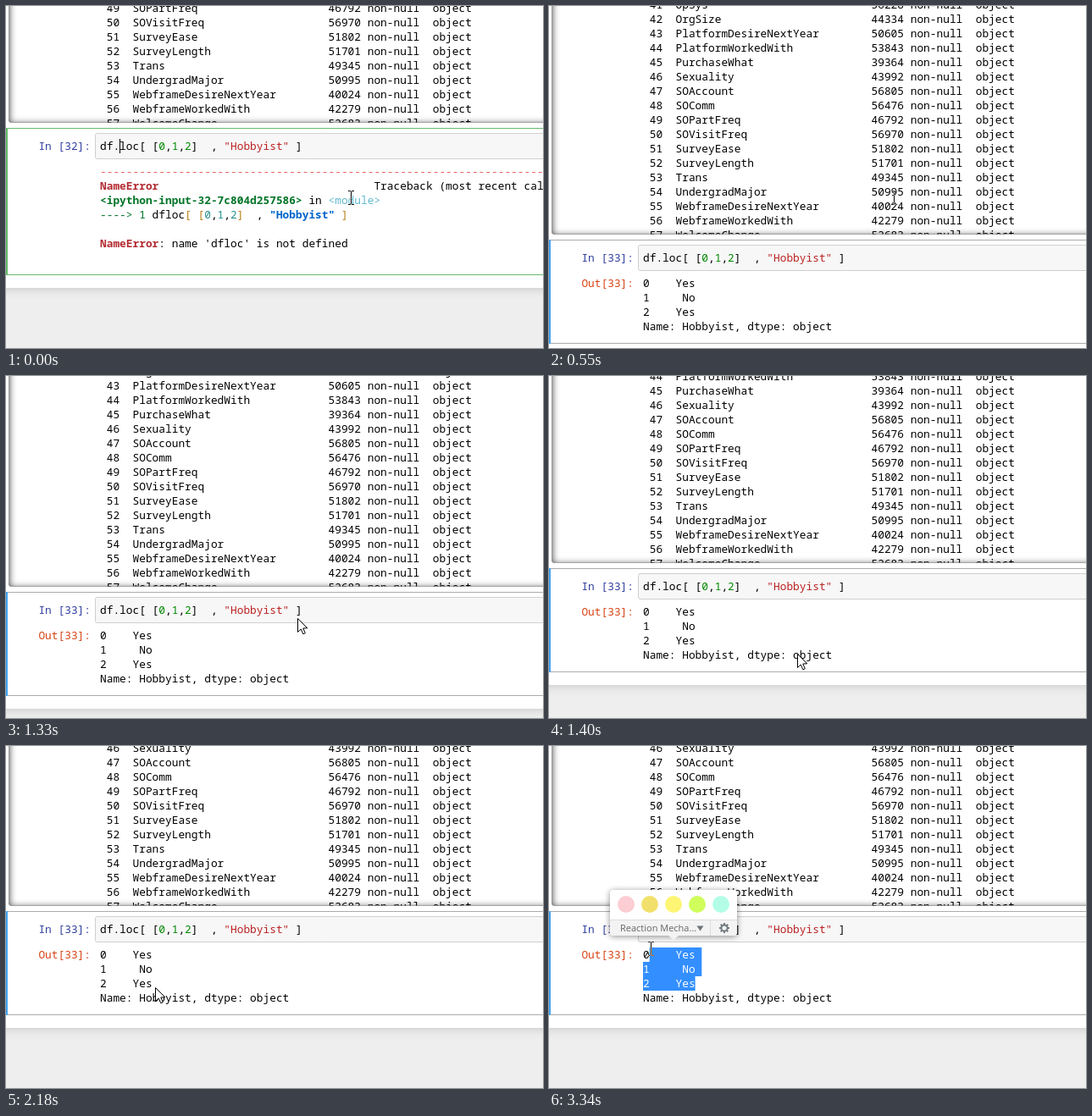
Recreate the animation shown at these times as an HTML page with a canvas. Size 634x404 px, loop 3.46 s.

```html
<!DOCTYPE html>
<html lang="en">
<head>
<meta charset="utf-8">
<title>Notebook cell</title>
<style>
html, body { margin: 0; width: 100%; height: 100%; overflow: hidden; background: #eee; }
canvas { display: block; }
</style>
</head>
<body>
<canvas id="stage" width="634" height="404"></canvas>
<script>
const W = 634, H = 404, LOOP = 3460;
const ctx = document.getElementById('stage').getContext('2d');
const CHAR = 7.7, LINE = 17, TEXT_X = 111;
const MONO = '12.83px "Noto Sans Mono", "DejaVu Sans Mono", monospace';
const INK = '#000', RED = '#b22b31', GREEN = '#007427', TEAL = '#258f8f', GOLD = '#b27d12';

const columns = [
  ['OpSys', 56228], ['OrgSize', 44334], ['PlatformDesireNextYear', 50605],
  ['PlatformWorkedWith', 53843], ['PurchaseWhat', 39364], ['Sexuality', 43992],
  ['SOAccount', 56805], ['SOComm', 56476], ['SOPartFreq', 46792],
  ['SOVisitFreq', 56970], ['SurveyEase', 51802], ['SurveyLength', 51701],
  ['Trans', 49345], ['UndergradMajor', 50995], ['WebframeDesireNextYear', 40024],
  ['WebframeWorkedWith', 42279], ['WelcomeChange', 52683]
];
const FIRST_ROW = 41;

const code = [['df.loc[ ['], ['0', '#080'], [','], ['1', '#080'], [','], ['2', '#080'],
  [']  , '], ['"Hobbyist"', '#ba2121'], [' ]']];
const traceback = [
  [['-'.repeat(75), '#e75c58']],
  [['NameError', RED, true], [' '.repeat(33) + 'Traceback (most recent call last)']],
  [['<ipython-input-32-7c804d257586>', GREEN, true], [' in '], ['<module>', '#5fb8cc']],
  [['----> 1', GREEN], [' dfloc'], ['[', GOLD], [' '], ['[', GOLD], ['0', TEAL], [','],
    ['1', TEAL], [','], ['2', TEAL], [']', GOLD], ['  , '], ['"Hobbyist"', '#0065ca', true],
    [' '], [']', GOLD]],
  [],
  [['NameError', RED, true], [": name 'dfloc' is not defined"]]
];
const result = ['0    Yes', '1     No', '2    Yes', 'Name: Hobbyist, dtype: object'];

// time, scroll offset
const scrolling = [[0, -51], [480, 81], [1240, 78], [1320, 60], [1400, 32], [1490, 7], [1570, 0]];
// time, x, y, shape
const pointer = [
  [0, 407, 226, 'beam'], [1160, 404, 227, 'arrow'], [1240, 384, 246, 'arrow'],
  [1320, 344, 286, 'arrow'], [1400, 293, 328, 'arrow'], [1490, 237, 314, 'arrow'],
  [1570, 202, 288, 'arrow'], [1640, 183, 270, 'arrow'], [1720, 180, 272, 'arrow'],
  [1800, 177, 275, 'arrow'], [1880, 175, 278, 'arrow'], [1960, 174, 281, 'arrow'],
  [2030, 175, 283, 'arrow'], [2180, 176, 285, 'arrow'], [2250, 170, 277, 'beam'],
  [2330, 175, 284, 'beam'], [2640, 170, 279, 'beam'], [2720, 159, 268, 'beam'],
  [2800, 147, 257, 'beam'], [2880, 136, 249, 'beam'], [2950, 128, 244, 'beam'],
  [3030, 121, 240, 'beam'], [3100, 120, 239, 'beam']
];

const at = (steps, t) => steps.findLast(s => s[0] <= t);

function rect(x, y, w, h, color) {
  ctx.fillStyle = color;
  ctx.fillRect(x, y, w, h);
}

function disc(x, y, r, color) {
  ctx.fillStyle = color;
  ctx.beginPath();
  ctx.arc(x, y, r, 0, 2 * Math.PI);
  ctx.fill();
}

function polygon(points, color) {
  ctx.fillStyle = color;
  ctx.beginPath();
  points.forEach(([x, y]) => ctx.lineTo(x, y));
  ctx.closePath();
  ctx.fill();
}

function shadow(color, blur, dy = 0) {
  ctx.shadowColor = color;
  ctx.shadowBlur = blur;
  ctx.shadowOffsetY = dy;
}

// Monospaced text on a character grid.
function mono(text, x, y, color = INK, bold = false) {
  ctx.font = (bold ? 'bold ' : '') + MONO;
  ctx.fillStyle = color;
  [...text].forEach((c, i) => {
    if (c !== ' ') ctx.fillText(c, x + i * CHAR, y);
  });
}

function spans(parts, x, y) {
  for (const [text, color, bold] of parts) {
    mono(text, x, y, color, bold);
    x += text.length * CHAR;
  }
}

function drawTable(off) {
  const bottom = 188.5 + off;
  ctx.save();
  ctx.beginPath();
  ctx.roundRect(3.5, -60, W + 60, bottom + 60, 2);
  ctx.clip();
  ctx.save();
  shadow('rgba(0,0,0,.8)', 8, 2);
  ctx.fillStyle = '#000';
  ctx.beginPath();
  ctx.rect(-60, -120, W + 200, bottom + 240);
  ctx.roundRect(3.5, -60, W + 60, bottom + 60, 2);
  ctx.fill('evenodd');
  ctx.restore();
  columns.forEach(([name, count], i) => {
    const id = FIRST_ROW + i;
    const row = ` ${id}  ${name.padEnd(30)}${count} non-null  object`;
    mono(row, TEXT_X, 143 + (id - 54) * LINE + off);
  });
  ctx.restore();
}

function drawSelection(t, x, y, top) {
  if (t < 2640) return null;
  const row = Math.max(0, Math.min(2, Math.floor((y - top) / LINE)));
  const col = Math.max(0, Math.min(8, Math.round((x - TEXT_X) / CHAR)));
  for (let r = row; r < 3; r++) {
    const from = TEXT_X + (r === row ? col * CHAR : 0);
    const to = TEXT_X + (r === 2 ? 8 : 9) * CHAR;
    rect(from, top + r * LINE, to - from, LINE, '#338fff');
  }
  return { row, col };
}

function drawCell(t, off, x, y) {
  const failed = t < 480, running = t >= 480 && t < 550;
  const top = 195 + off;
  const height = failed ? 174 : running ? 42 : 123;
  const edge = failed ? '#66bb6a' : '#ababab';

  rect(0, top, W, 1, edge);
  rect(0, top + height - 1, W, 1, edge);
  rect(0, top, 2, height, failed ? '#66bb6a' : '#42a5f5');

  ctx.beginPath();
  ctx.roundRect(105.5, top + 6.5, W, 30, 2);
  ctx.fillStyle = '#f7f7f7';
  ctx.fill();
  ctx.strokeStyle = '#cfcfcf';
  ctx.lineWidth = 1;
  ctx.stroke();

  const prompt = failed ? 'In [32]:' : running ? ' In [*]:' : 'In [33]:';
  mono(prompt, 38.4, top + 26, '#303f9f');
  spans(code, TEXT_X, top + 26);
  if (t < 300) rect(134, top + 13, 1, 17, '#000');

  const base = top + 56;
  if (failed) {
    traceback.forEach((line, i) => spans(line, TEXT_X, base + i * LINE));
  } else if (!running) {
    mono('Out[33]:', 38.4, base, '#d84315');
    const picked = drawSelection(t, x, y, top + 43);
    result.forEach((line, r) => {
      let cut = line.length;
      if (picked && r < 3 && r >= picked.row) cut = r === picked.row ? picked.col : 0;
      mono(line.slice(0, cut), TEXT_X, base + r * LINE);
      mono(line.slice(cut), TEXT_X + cut * CHAR, base + r * LINE, '#fff');
    });
  }
}

function drawPopup(alpha) {
  ctx.save();
  ctx.globalAlpha = alpha;
  ctx.save();
  shadow('rgba(0,0,0,.45)', 7, 1);
  ctx.fillStyle = '#fff';
  ctx.beginPath();
  ctx.roundRect(72, 170, 150, 54, 4);
  ctx.fill();
  ctx.restore();
  ctx.fillStyle = '#f3f3f3';
  ctx.beginPath();
  ctx.roundRect(72, 205, 150, 19, [0, 0, 4, 4]);
  ctx.fill();
  rect(72, 205, 150, 1, '#dcdcdc');
  rect(190, 206, 1, 18, '#dcdcdc');
  polygon([[141, 224], [153, 224], [147, 229]], '#f3f3f3');
  ['#fccdd3', '#f2e06c', '#fdf573', '#d0fd5b', '#b3fde6']
    .forEach((color, i) => disc(91 + i * 28, 187, 10, color));
  ctx.font = '11px "Open Sans", "Noto Sans", sans-serif';
  ctx.fillStyle = '#666';
  ctx.fillText('Reaction Mecha...', 84, 219);
  polygon([[174.5, 212.5], [182.5, 212.5], [178.5, 218.5]], '#707478');

  ctx.strokeStyle = '#707a82';
  ctx.lineWidth = 2;
  ctx.beginPath();
  ctx.arc(207, 215, 3.6, 0, 2 * Math.PI);
  ctx.stroke();
  for (let i = 0; i < 8; i++) {
    const c = Math.cos(i * Math.PI / 4), s = Math.sin(i * Math.PI / 4);
    ctx.beginPath();
    ctx.moveTo(207 + 4 * c, 215 + 4 * s);
    ctx.lineTo(207 + 6 * c, 215 + 6 * s);
    ctx.stroke();
  }
  ctx.restore();
}

function drawPointer(x, y, shape) {
  ctx.save();
  if (shape === 'beam') {
    // The text pointer inverts what lies below it.
    ctx.globalCompositeOperation = 'difference';
    rect(x, y - 7, 1, 15, '#fff');
    for (const edge of [y - 8, y + 8]) {
      rect(x - 3, edge, 3, 1, '#fff');
      rect(x + 1, edge, 3, 1, '#fff');
    }
  } else {
    ctx.translate(x + .5, y + .5);
    polygon([[0, 0], [0, 16], [3.7, 12.5], [6.3, 18.3], [8.8, 17.2], [6.3, 11.5], [11.3, 11.3]], '#fff');
    ctx.strokeStyle = '#000';
    ctx.lineWidth = 1;
    ctx.stroke();
  }
  ctx.restore();
}

function draw(t) {
  const off = at(scrolling, t)[1];
  const [, x, y, shape] = at(pointer, t);
  const end = (t < 550 ? 333 : 333 + off);

  rect(0, 0, W, H, '#eee');
  ctx.save();
  shadow('rgba(87,87,87,.3)', 12);
  rect(-40, -40, W + 80, end + 40, '#fff');
  ctx.restore();

  drawTable(off);
  drawCell(t, off, x, y);
  if (t >= 2560 && t < 3100) disc(t < 2640 || t >= 3030 ? x : x - 3, y, 12, 'rgba(250,236,40,.72)');
  if (t >= 3270) drawPopup(t < 3340 ? .5 : 1);
  drawPointer(x, y, shape);
}

function tick() {
  draw(performance.now() % LOOP);
  requestAnimationFrame(tick);
}
tick();
</script>
</body>
</html>
```
